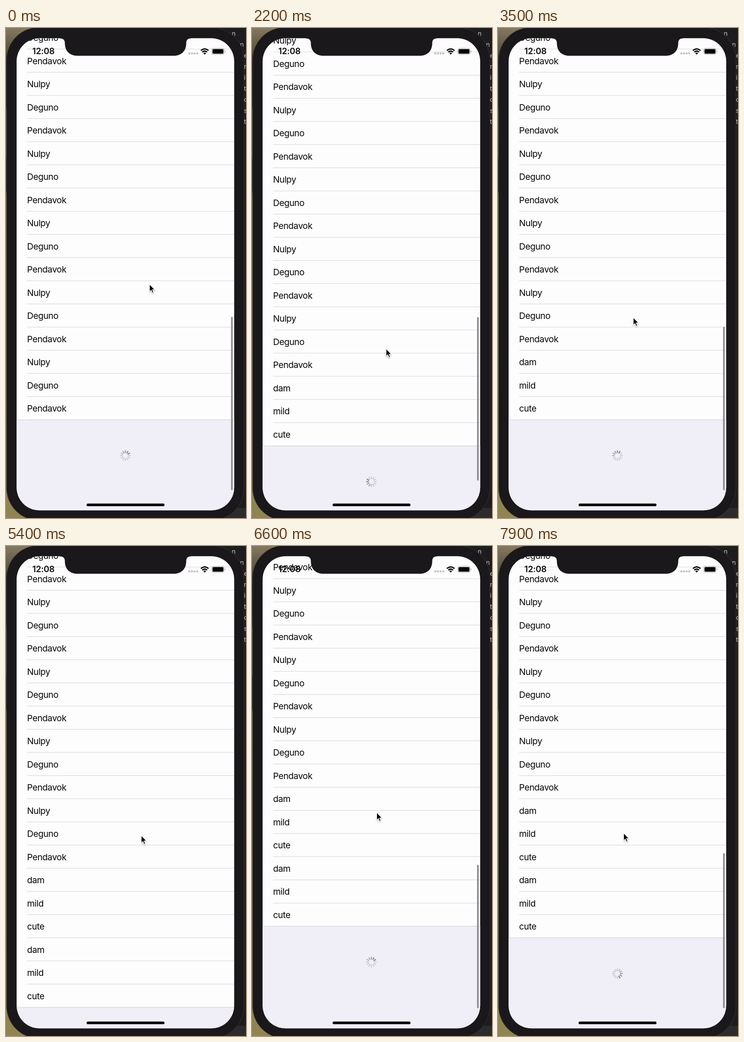
An HTML page that plays this animation: 524x1068 px, repeating every 8 s.

```html
<!DOCTYPE html>
<html lang="en">
<head>
<meta charset="utf-8">
<title>Endless list</title>
<style>
  html, body { margin: 0; width: 100%; height: 100%; overflow: hidden; background: #1c1b1d; }
  svg { display: block; width: 100vw; height: 100vh; font-family: Inter, Roboto, sans-serif; }
  #rows text { font-size: 19.2px; letter-spacing: -.45px; fill: #060606; }
  #rows rect, .edge { fill: #d1d1d5; }
  #behind text { font-size: 14px; fill: #c4c4c4; }
</style>
</head>
<body>
<svg viewBox="0 0 524 1068">
  <defs>
    <linearGradient id="wall" x2="0" y2="1">
      <stop offset="0" stop-color="#85795f"/>
      <stop offset=".05" stop-color="#575040"/>
      <stop offset=".07" stop-color="#22221f"/>
      <stop offset=".16" stop-color="#2b2a25"/>
      <stop offset=".17" stop-color="#625f4b"/>
      <stop offset=".26" stop-color="#5c5946"/>
      <stop offset=".27" stop-color="#2c2b25"/>
      <stop offset=".33" stop-color="#2c2b25"/>
      <stop offset=".34" stop-color="#7a7454"/>
      <stop offset="1" stop-color="#908452"/>
    </linearGradient>
    <clipPath id="screen"><rect x="23.2" y="22.3" width="475" height="1029" rx="50"/></clipPath>
    <filter id="soft" x="-50%" y="-50%" width="200%" height="200%">
      <feDropShadow dx="0" dy="1.5" stdDeviation="1.2" flood-opacity=".35"/>
    </filter>
  </defs>

  <g id="behind">
    <rect width="262" height="1068" fill="url(#wall)"/>
    <rect x="262" width="262" height="1068" fill="#1d1d1e"/>
    <rect x="470" y="1046" width="54" height="22" fill="#2c2c2d"/>
  </g>

  <rect x="1.5" y="-1" width="518" height="1074" rx="70" fill="#1a181b" stroke="#343335"/>

  <g clip-path="url(#screen)">
    <rect x="23" y="22" width="476" height="1030" fill="#fefdfe"/>
    <g id="rows"></g>
    <g id="footer">
      <rect x="23" width="476" height="1100" fill="#f0eff7"/>
      <rect class="edge" x="23" y="-.5" width="476" height="1"/>
      <g id="spinner" transform="translate(260.7 78)"></g>
    </g>
    <rect id="bar" x="491.4" width="3.6" rx="1.8" fill="#8c8c8f"/>
  </g>

  <path fill="#1a181b" d="M117 20H404V22.5Q393.5 22.5 393.5 33C393.5 50 383 60.5 366 60.5H156C139 60.5 128.5 50 128.5 33Q128.5 22.5 117 22.5Z"/>

  <text x="57.5" y="57.3" font-size="18.6" font-weight="600" letter-spacing="-.2" fill="#0b0b0b">12:08</text>
  <g id="signal" fill="#c3c3c5"></g>
  <g fill="none" stroke="#050505" stroke-width="2.7">
    <path d="M425.5 49.3Q433.8 41.8 442.1 49.3"/>
    <path d="M428.5 52.6Q433.8 47.9 439.1 52.6"/>
    <path fill="#050505" stroke="none" d="M430.7 54.7Q433.8 52.2 436.9 54.7L433.8 58Z"/>
  </g>
  <rect x="449" y="44.3" width="27.5" height="13.4" rx="4" fill="none" stroke="#a0a0a2"/>
  <rect x="450.8" y="46" width="24" height="10" rx="2.5" fill="#050505"/>
  <path d="M478 48.5Q480.2 51 478 53.5Z" fill="#a0a0a2"/>
  <rect x="176" y="1036.6" width="170" height="5.7" rx="2.85" fill="#050505"/>

  <path id="cursor" d="M0 0V16.6L3.7 13.2L6.3 19.2L9 18L6.5 12.1H11.5Z"
        fill="#050505" stroke="#fff" stroke-width="1.2" filter="url(#soft)"/>
</svg>

<script>
const LOOP = 8000, STEP = 100, PITCH = 50.5, FIRST_ROWS = 16, SPOKES = 12;
const BLOCK = 3 * PITCH;
const firstNames = ['Pendavok', 'Nulpy', 'Deguno'];
const addedNames = ['dam', 'mild', 'cute'];

const $ = id => document.getElementById(id);

function add(parent, tag, attrs, text = '') {
  const node = document.createElementNS('http://www.w3.org/2000/svg', tag);
  for (const key in attrs) node.setAttribute(key, attrs[key]);
  node.textContent = text;
  return parent.appendChild(node);
}

// Eased value at time t through [time, value] points.
function track(t, points) {
  if (t <= points[0][0]) return points[0][1];
  for (let i = 1; i < points.length; i++) {
    const [t0, a] = points[i - 1], [t1, b] = points[i];
    if (t < t1) {
      const p = (t - t0) / (t1 - t0);
      return a + (b - a) * p * p * (3 - 2 * p);
    }
  }
  return points[points.length - 1][1];
}

for (let k = -1; k < FIRST_ROWS + 6; k++) {
  const name = k < FIRST_ROWS ? firstNames[(k + 3) % 3] : addedNames[(k - FIRST_ROWS) % 3];
  add($('rows'), 'text', { x: 46, y: 78.7 + k * PITCH }, name);
  add($('rows'), 'rect', { x: 46, y: 95.9 + k * PITCH, width: 453, height: 1 });
}

for (let i = 0; i < 4; i++)
  add($('signal'), 'rect', { x: 398 + i * 5.8, y: 53.3, width: 4.3, height: 4.3, rx: 1.3 });

const spokes = Array.from({ length: SPOKES }, (_, i) => add($('spinner'), 'rect', {
  x: -1.2, y: -11.8, width: 2.4, height: 6.4, rx: 1.2, fill: '#3c3c40',
  transform: `rotate(${i * 360 / SPOKES})`
}));

[...'nneritcst'].forEach((letter, i) =>
  add($('behind'), 'text', { x: [493, 511][i] ?? 519.5, y: 17 + i * 24 }, letter));

const scrollPath = [
  [1700, 0], [2600, BLOCK + 11], [3100, BLOCK],
  [6050, BLOCK], [6600, 2 * BLOCK + 25.2], [7150, 2 * BLOCK]
];
const cursorX = [[0, 313.3], [1500, 289.3], [1700, 289.3], [2600, 295.3], [5800, 295.3], [6600, 272.3], [6800, 272.3], [7400, 274.3]];
const cursorY = [[0, 558.3], [1500, 794.3], [1700, 794.3], [2600, 630.8], [5800, 630.8], [6050, 757], [6600, 580.8], [6800, 580.8], [7400, 625.5]];
const barAlpha = [[1000, 1], [1300, 0], [1700, 0], [1850, 1], [3550, 1], [3900, 0], [6000, 0], [6150, 1]];

function draw(t) {
  const batch = t < 1600 ? 0 : t < 5400 ? 1 : 2;
  const scroll = track(t, scrollPath);
  const beyond = scroll - batch * BLOCK;
  $('rows').setAttribute('transform', `translate(0 ${-scroll})`);
  $('footer').setAttribute('transform', `translate(0 ${854 - beyond})`);

  // The thumb shrinks when pulled past the end of the list.
  const over = Math.max(beyond, 0), under = Math.min(beyond, 0);
  const length = [378, 356.5, 338][batch] - over;
  $('bar').setAttribute('y', 1007.5 - length + under * .37);
  $('bar').setAttribute('height', length);
  $('bar').setAttribute('opacity', track(t, barAlpha));

  $('spinner').setAttribute('visibility', beyond > -60 ? 'visible' : 'hidden');
  const phase = [2.05, 3.1 - 2.6 * SPOKES, 2.2 - 6.6 * SPOKES][batch];
  const head = Math.floor(phase + t * SPOKES / 1000);
  spokes.forEach((spoke, i) => {
    const age = ((head - i) % SPOKES + SPOKES) % SPOKES;
    spoke.setAttribute('opacity', Math.max(.2, .62 - age * .08));
  });

  $('cursor').setAttribute('transform', `translate(${track(t, cursorX)} ${track(t, cursorY)})`);
}

function frame() {
  draw(Math.floor(performance.now() % LOOP / STEP) * STEP);
  requestAnimationFrame(frame);
}
frame();
</script>
</body>
</html>
```
